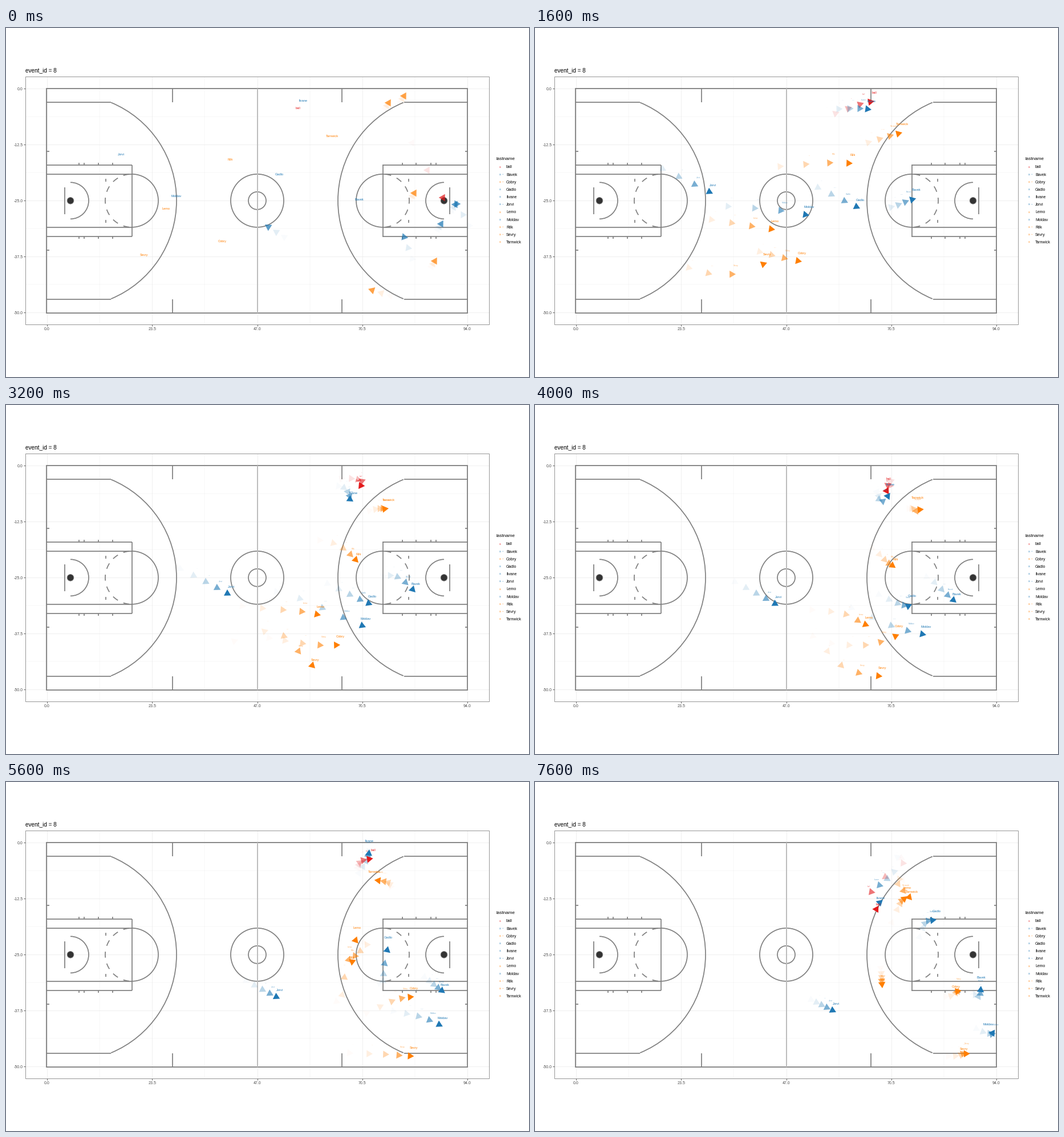
Write a matplotlib script that moves like this. It is 917 by 611 pixels and loops after 8 s.

```python
import numpy as np
import matplotlib.pyplot as plt
from matplotlib.animation import FuncAnimation
from matplotlib.patches import Arc, Circle, Polygon, Rectangle

W, H, DPI = 917, 611, 100
PT = 72 / DPI
FRAMES, INTERVAL = 20, 400
BLUE, ORANGE, RED = "#1f78b4", "#ff7f00", "#e31a1c"
LINE = "#7f7f7f"
LEFT, RIGHT, TOP, BOTTOM = 71.4, 809.3, 106, 498.9
CX, CY = 440.5, 302.3
RADIUS = 7.2
WAKE = 5

plt.rcParams["font.family"] = "Liberation Sans"
fig = plt.figure(figsize=(W / DPI, H / DPI), dpi=DPI, facecolor="white")
ax = fig.add_axes([0, 0, 1, 1])
ax.set(xlim=(0, W), ylim=(H, 0))
ax.axis("off")


def write(x, y, text, size, color="black", ha="center", **kw):
    return ax.text(x, y + 0.36 * size, text, fontsize=size * PT, color=color,
                   ha=ha, va="baseline", **kw)


def line(x0, y0, x1, y1, color=LINE, width=1.7, z=2):
    ax.plot([x0, x1], [y0, y1], color=color, lw=width * PT, zorder=z,
            solid_capstyle="butt")


def arc(x, y, r, start, end):
    ax.add_patch(Arc((x, y), 2 * r, 2 * r, theta1=start, theta2=end,
                     color=LINE, lw=1.7 * PT, zorder=2))


def draw_axes():
    for i in range(5):
        x, y = 72 + 184.25 * i, 106 + 98.05 * i
        line(x, 85, x, 519, "#ebebeb", 0.8, 0)
        line(34, y, 847, y, "#ebebeb", 0.8, 0)
        if i < 4:
            line(x + 92.1, 85, x + 92.1, 519, "#ebebeb", 0.4, 0)
            line(34, y + 49, 847, y + 49, "#ebebeb", 0.4, 0)
        line(x, 519, x, 522, "#333333", 0.8)
        line(31, y, 34, y, "#333333", 0.8)
        write(x, 526, f"{23.5 * i:.1f}", 7, "#4d4d4d")
        write(30, y, f"{-12.5 * i:.1f}" if i else "0.0", 7, "#4d4d4d", "right")
    ax.add_patch(Rectangle((34, 85), 813, 434, fill=False, ec="#8c8c8c",
                           lw=0.9 * PT, zorder=2))
    write(33.5, 74, "event_id = 8", 10, ha="left")


def draw_half(side):
    """side = 1 draws the left half, -1 its mirror image."""
    def mx(x):
        return CX + side * (x - CX)

    def seg(x0, y0, x1, y1):
        line(mx(x0), y0, mx(x1), y1)

    def half_arc(x, r, start, end):
        if side == -1:
            start, end = 180 - end, 180 - start
        arc(mx(x), CY, r, start, end)

    for y, inward in ((TOP, 1), (BOTTOM, -1)):
        seg(292.4, y, 292.4, y + 24 * inward)
        seg(LEFT, y + 24.4 * inward, 183.5, y + 24.4 * inward)
        seg(LEFT, y + 109.6 * inward, 76, y + 109.6 * inward)
        lane = y + 134.3 * inward
        seg(LEFT, lane, 221.2, lane)
        seg(LEFT, lane + 15.7 * inward, 221.2, lane + 15.7 * inward)
        for x in (127.5, 136.5, 162, 186.5):
            seg(x, lane, x, lane - 4.5 * inward)
        seg(174.6, lane + 24 * inward, 174.6, lane + 28.3 * inward)
    seg(220.5, 240, 220.5, 364.5)
    seg(102.8, 279, 102.8, 326)
    half_arc(113, 186, -67.5, 67.5)
    half_arc(113, 32, -90, 90)
    half_arc(220.5, 46.5, -90, 90)
    for angle in range(102, 259, 26):
        half_arc(220.5, 46.5, angle - 6.5, angle + 6.5)
    ax.add_patch(Circle((mx(113), CY), 5.8, fc="#333333", ec=LINE,
                        lw=0.6, zorder=2))


def draw_court():
    ax.add_patch(Rectangle((LEFT, TOP), RIGHT - LEFT, BOTTOM - TOP,
                           fill=False, ec=LINE, lw=1.8 * PT, zorder=2))
    for r in (15.5, 46.5):
        arc(CX, CY, r, 0, 360)
    draw_half(1)
    draw_half(-1)
    line(CX, TOP, CX, BOTTOM, "#bdbdbd", 2)


class Runner:
    """Runs smoothly through (step, x, y) points.

    `rest` is where the prior play ended, `drift` its last move.
    """

    def __init__(self, name, color, *points, rest, drift=(3, -5)):
        self.name, self.color = name, color
        self.rest, self.drift = np.array(rest), np.array(drift)
        data = np.array(points, float)
        self.times, self.spots = data[:, 0], data[:, 1:]
        self.speeds = np.gradient(self.spots, self.times, axis=0)

    def tip(self, t):
        """Cubic Hermite interpolation between the neighbouring points."""
        i = np.searchsorted(self.times[1:-1], t, side="right")
        span = self.times[i + 1] - self.times[i]
        u = (t - self.times[i]) / span
        p, q = self.spots[i:i + 2]
        m, n = self.speeds[i:i + 2] * span
        ease = u * u * (3 - 2 * u)
        return p + (q - p) * ease + u * (1 - u) * (m * (1 - u) - n * u)

    def arrow(self, t):
        """Centre and heading of the arrow head at step t."""
        if t < 0:
            return self.rest + min(t + 2, 0) * self.drift, self.drift
        move = self.tip(t) - self.tip(t - 1)
        heading = move / max(np.hypot(*move), 1e-6)
        return self.tip(t) - RADIUS * heading, heading


runners = [
    Runner("ball", RED, (0, 512, 155), (4, 595, 128), (6, 624, 133),
           (8, 618, 147), (12, 626, 137), (16, 641, 148), (18, 585, 198),
           (19, 602, 229), rest=(766, 297), drift=(27, 48)),
    Runner("Bavek", BLUE, (0, 619, 315), (6, 693, 304), (8, 718, 328),
           (12, 756, 359), (16, 779, 373), (19, 782, 357), rest=(788, 309)),
    Runner("Cobry", ORANGE, (0, 379, 388), (4, 468, 409), (8, 586, 420),
           (12, 683, 381), (16, 736, 372), (18, 743, 360), (19, 738, 373),
           rest=(752, 408)),
    Runner("Gadlo", BLUE, (0, 479, 271), (4, 570, 316), (10, 661, 349),
           (12, 662, 329), (16, 682, 249), (19, 704, 241), rest=(763, 343)),
    Runner("Ilvane", BLUE, (0, 521, 142), (4, 590, 143), (8, 609, 169),
           (12, 634, 132), (14, 637, 118), (16, 628, 164), (18, 599, 186),
           (19, 606, 218), rest=(790, 308), drift=(-11, -19)),
    Runner("Jorvi", BLUE, (0, 202, 236), (4, 312, 290), (12, 456, 367),
           (19, 528, 403), rest=(460, 348), drift=(-14, -9)),
    Runner("Lemo", ORANGE, (0, 281, 331), (4, 421, 353), (8, 552, 368),
           (10, 586, 387), (12, 594, 335), (16, 638, 217), (19, 653, 200),
           rest=(642, 459), drift=(-16, -5)),
    Runner("Moldav", BLUE, (0, 299, 309), (4, 481, 328), (8, 631, 389),
           (12, 730, 412), (16, 792, 440), (18, 808, 440), (19, 795, 439),
           rest=(698, 366), drift=(-7, -19)),
    Runner("Rilk", ORANGE, (0, 393, 245), (4, 557, 237), (8, 618, 276),
           (11, 629, 291), (12, 615, 300), (16, 608, 342), (19, 609, 361),
           rest=(716, 289)),
    Runner("Sevry", ORANGE, (0, 242, 412), (3, 352, 431), (5, 460, 394),
           (8, 542, 461), (12, 672, 477), (16, 744, 479), (18, 757, 473),
           (19, 752, 482), rest=(671, 131)),
    Runner("Tarnwick", ORANGE, (0, 572, 204), (4, 644, 183), (8, 671, 181),
           (12, 663, 174), (16, 635, 176), (19, 661, 207), rest=(698, 119)),
]


def draw_legend():
    dotted = ("Bavek", "Cobry", "Jorvi", "Rilk", "Sevry")
    write(860, 228, "lastname", 8.2, ha="left")
    for i, runner in enumerate(runners):
        y = 243 + 13.15 * i
        write(866.5, y, "a", 4.6, runner.color, alpha=0.85)
        if runner.name in dotted:
            ax.add_patch(Circle((871.3, y), 0.6, fc=runner.color, alpha=0.7))
        write(877, y, runner.name, 6.9, ha="left")


draw_axes()
draw_court()
draw_legend()
moving = []


def draw_arrow(runner, t, alpha):
    centre, heading = runner.arrow(t)
    angles = np.arctan2(heading[1], heading[0]) + np.arange(3) * 2 * np.pi / 3
    corners = centre + RADIUS * np.column_stack([np.cos(angles), np.sin(angles)])
    return ax.add_patch(Polygon(corners, fc=runner.color, ec="none",
                                alpha=alpha, zorder=4 + alpha))


def update(frame):
    while moving:
        moving.pop().remove()
    for lag in reversed(range(WAKE)):
        t = frame - lag
        fade = 1 - lag / WAKE
        alpha = fade ** 2.3
        for runner in runners:
            if t != 0:
                moving.append(draw_arrow(runner, t, alpha))
            if t >= 0:
                x, y = runner.tip(t)
                moving.append(write(x, y - 15, runner.name,
                                    5.6 * alpha, runner.color,
                                    alpha=alpha, zorder=6))
    return moving


anim = FuncAnimation(fig, update, frames=FRAMES, interval=INTERVAL,
                     repeat=True, repeat_delay=0, blit=False)
plt.show()
```
